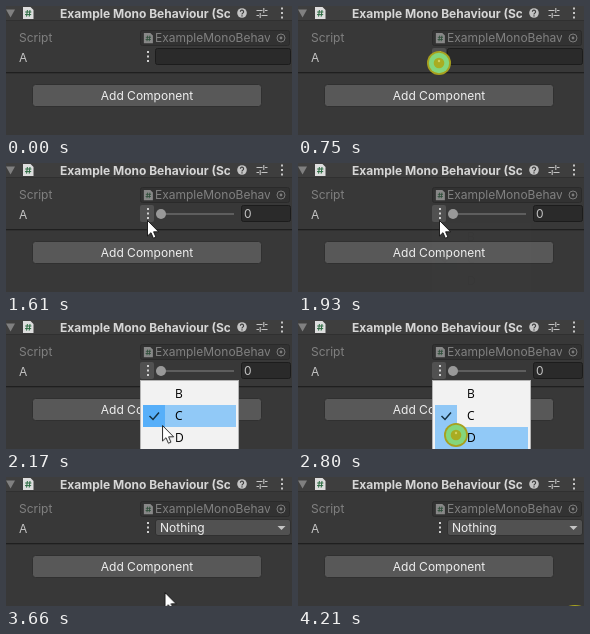
An HTML page for the animation above (4310 ms loop, 286 by 129 pixels).

```html
<!DOCTYPE html>
<html lang="en">
<head>
<meta charset="utf-8">
<title>Inspector field type menu</title>
<style>
html, body { margin: 0; height: 100%; overflow: hidden; background: #383838; }
svg.stage { display: block; width: 100vw; height: 100vh; }
text { font: 12px Inter, sans-serif; fill: #c4c4c4; }
.title { font-weight: 700; fill: #d6d6d6; }
.dim { fill: #808080; }
.bright { fill: #eee; }
.menu text { font: 12px "Open Sans", sans-serif; fill: #000; }
.row { fill: #91c9f7; }
.input { fill: #2a2a2a; stroke: #1c1c1c; }

.anim { animation: 4310ms linear infinite; }
.step { animation-timing-function: step-end; }
.cursor { animation-name: move; }
.arrow { animation-name: arrow; }
.ring { animation-name: ring; }
.hot { animation-name: hot; }
.popup { animation-name: popup; }
.hover { animation-name: hover; }
.check { animation-name: check; }
.pick-c { animation-name: pick-c; }
.pick-d { animation-name: pick-d; }
.field { animation-name: field; }
.slider { animation-name: slider; }
.drop { animation-name: drop; }

/* 1% = 43.1 ms */
@keyframes move {
  0%, 1.6% { transform: translate(199px, 131px); animation-timing-function: cubic-bezier(.3, .2, .4, 1); }
  12.53%, 19.49% { transform: translate(141px, 57px); animation-timing-function: ease-in-out; }
  26.45% { transform: translate(156px, 91px); }
  28.54%, 32.25% { transform: translate(157px, 93px); animation-timing-function: ease-in-out; }
  37.3%, 44.78% { transform: translate(141px, 57px); animation-timing-function: ease-in-out; }
  50.35% { transform: translate(156px, 105px); }
  53.83% { transform: translate(158px, 114px); }
  55.45%, 84.6% { transform: translate(158px, 115px); animation-timing-function: ease-in; }
  91.88% { transform: translate(269px, 128px); }
  93.5%, 100% { transform: translate(277px, 139.5px); }
}
@keyframes arrow {
  0% { opacity: 0; }
  1.6% { opacity: 1; }
  17.39% { opacity: 0; }
  19.49% { opacity: 1; }
  30.15% { opacity: 0; }
  31.79% { opacity: 1; }
  42.68% { opacity: 0; }
  44.78% { opacity: 1; }
  64.95% { opacity: 0; }
  67.05% { opacity: 1; }
  93.5%, 100% { opacity: 0; }
}
@keyframes ring {
  0% { opacity: 0; }
  17.39% { opacity: 1; }
  19.49% { opacity: 0; }
  30.15% { opacity: 1; }
  31.79% { opacity: 0; }
  42.68% { opacity: 1; }
  44.78% { opacity: 0; }
  64.95% { opacity: 1; }
  67.05% { opacity: 0; }
  97.66%, 100% { opacity: 1; }
}
@keyframes hot {
  0% { opacity: 0; }
  11% { opacity: 1; }
  31.79% { opacity: 0; }
  36.5% { opacity: 1; }
  67.05%, 100% { opacity: 0; }
}
@keyframes popup {
  0%, 19.49% { opacity: 0; }
  21.5%, 31.78% { opacity: 1; }
  31.79%, 44.78% { opacity: 0; }
  46.8%, 67.04% { opacity: 1; }
  67.05%, 100% { opacity: 0; }
}
@keyframes hover {
  0% { opacity: 0; transform: none; }
  21.46% { opacity: 1; transform: none; }
  24.48% { opacity: 1; transform: translateY(22px); }
  31.79% { opacity: 0; transform: none; }
  46.06% { opacity: 1; transform: none; }
  47.8% { opacity: 1; transform: translateY(22px); }
  51.04% { opacity: 1; transform: translateY(44px); }
  67.05%, 100% { opacity: 0; transform: none; }
}
@keyframes check {
  0% { transform: none; }
  31.79%, 100% { transform: translateY(22px); }
}
@keyframes pick-c {
  0%, 31.78% { opacity: 0; }
  31.79% { opacity: 1; }
  37.2%, 100% { opacity: 0; }
}
@keyframes pick-d {
  0%, 67.04% { opacity: 0; }
  67.05% { opacity: 1; }
  74.2%, 100% { opacity: 0; }
}
@keyframes field {
  0% { opacity: 1; }
  31.79%, 100% { opacity: 0; }
}
@keyframes slider {
  0% { opacity: 0; }
  31.79% { opacity: 1; }
  67.05%, 100% { opacity: 0; }
}
@keyframes drop {
  0% { opacity: 0; }
  67.05%, 100% { opacity: 1; }
}
</style>
</head>
<body>
<svg class="stage" viewBox="0 0 286 129" preserveAspectRatio="none">
  <defs>
    <g id="script">
      <path d="M1 0H8.5L11.5 3V12H1Z" fill="#dedede"/>
      <path d="M5.4 3 4.6 9.6M8 3 7.2 9.6M3.2 5H9.4M3 7.6H9.2" fill="none" stroke="#2a6a40" stroke-width="1"/>
    </g>
    <g id="dots">
      <rect x="-1" y="-5.5" width="2" height="2"/>
      <rect x="-1" y="-1" width="2" height="2"/>
      <rect x="-1" y="3.5" width="2" height="2"/>
    </g>
    <rect id="row" class="row" x="137" y="63" width="93" height="22"/>
  </defs>

  <rect width="286" height="129" fill="#383838"/>

  <!-- component header -->
  <rect width="286" height="14" fill="#3e3e3e"/>
  <rect y="14" width="286" height="1" fill="#303030"/>
  <path d="M0 3.5H9L4.5 11.5Z" fill="#808080"/>
  <use href="#script" x="16" y="1"/>
  <svg width="224" height="16"><text class="title" x="54" y="11.5">Example Mono Behaviour (Script)</text></svg>
  <circle cx="236" cy="7" r="4.8" fill="#c4c4c4"/>
  <path d="M234.4 5.8a1.6 1.6 0 1 1 2.3 1.4q-.7.4-.7 1.2M236 9.2v1.2" fill="none" stroke="#3e3e3e" stroke-width="1.2"/>
  <path d="M250.5 4.5H256.5M259 4.5H261.5M250.5 9.5H253M255.5 9.5H261.5M257.8 2V7M254.2 7V12" fill="none" stroke="#c4c4c4" stroke-width="1.1"/>
  <use href="#dots" x="276" y="7" fill="#c4c4c4"/>

  <!-- script row -->
  <text class="dim" x="13" y="36">Script</text>
  <rect x="134.5" y="24.5" width="149" height="15" rx="2" fill="#323232" stroke="#2a2a2a"/>
  <use href="#script" transform="translate(137 27) scale(.86)" opacity=".5"/>
  <svg width="264" height="42"><text class="dim" x="149" y="36">ExampleMonoBehaviour</text></svg>
  <circle cx="275" cy="32" r="4" fill="none" stroke="#7c7c7c"/>
  <circle cx="275" cy="32" r="1.4" fill="#7c7c7c"/>

  <!-- value row -->
  <text x="13" y="56">A</text>
  <rect class="hot anim step" x="134" y="42" width="14" height="17" rx="2" fill="#515151"/>
  <use href="#dots" x="142" y="50.5" fill="#d0d0d0"/>
  <g class="field anim step">
    <rect class="input" x="149.5" y="42.5" width="135" height="16" rx="2"/>
  </g>
  <g class="slider anim step">
    <rect x="150" y="50" width="78" height="2" fill="#5e5e5e"/>
    <circle cx="155" cy="51" r="5" fill="#999"/>
    <rect class="input" x="235.5" y="42.5" width="49" height="16" rx="2"/>
    <text x="238" y="55">0</text>
  </g>
  <g class="drop anim step">
    <rect x="149.5" y="42.5" width="135" height="16" rx="2.5" fill="#515151" stroke="#303030"/>
    <text class="bright" x="154" y="55">Nothing</text>
    <path d="M271.5 49H279.5L275.5 53Z" fill="#c4c4c4"/>
  </g>

  <rect y="66" width="286" height="1" fill="#1f1f1f"/>
  <rect y="67" width="286" height="1" fill="#303030"/>
  <rect x="26.5" y="78.5" width="229" height="22" rx="3" fill="#585858" stroke="#303030"/>
  <text class="bright" x="141" y="94" text-anchor="middle">Add Component</text>

  <!-- popup menu and the fading chosen rows -->
  <g class="menu">
    <g class="popup anim">
      <rect x="134.5" y="60.5" width="98" height="80" fill="#f2f2f2" stroke="#b4b4b4"/>
      <use href="#row" class="hover anim step"/>
      <g class="check anim step">
        <rect x="137" y="63" width="22" height="22" fill="#0089fc" opacity=".4"/>
        <path d="M143.5 74 147 77.5 153 70.5" fill="none" stroke="#14303f" stroke-width="1.5"/>
      </g>
      <text x="169" y="78">B</text>
      <text x="169" y="100">C</text>
      <text x="169" y="122">D</text>
    </g>
    <g class="pick-c anim">
      <use href="#row" y="22"/>
      <text x="169" y="100">C</text>
    </g>
    <g class="pick-d anim">
      <use href="#row" y="44"/>
      <text x="169" y="122">D</text>
    </g>
  </g>

  <!-- pointer and click mark -->
  <g class="cursor anim">
    <path class="arrow anim step" d="M.5 .5V16L4 12.7 6.4 18.2 8.9 17.1 6.6 11.8H11.6Z" fill="#fff" stroke="#111" stroke-width=".9"/>
    <g class="ring anim step">
      <circle r="12" fill="#a8a01e"/>
      <circle r="10.2" fill="#84d67c"/>
      <circle r="5.3" fill="#a9ac22"/>
      <circle cy="-2" r="1.2" fill="#d2d060"/>
    </g>
  </g>
</svg>
</body>
</html>
```
